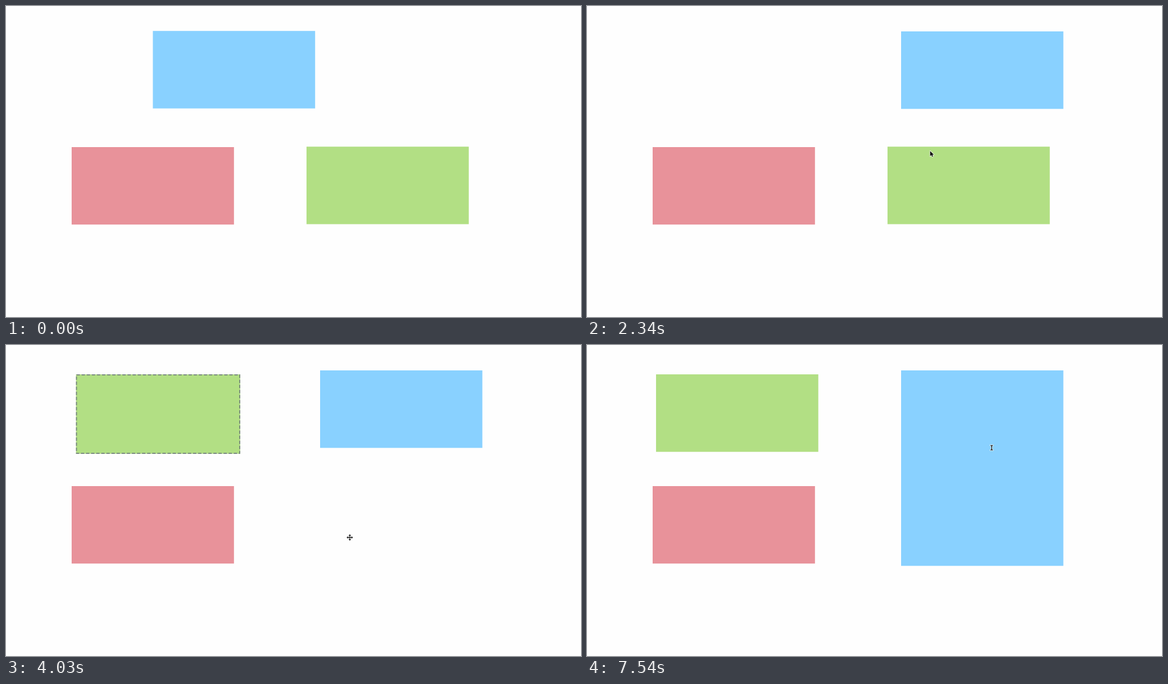
These frames come from a looping animation (1016 px wide and 551 px high, 8000 ms). An HTML page:

```html
<!DOCTYPE html>
<html lang="en">
<head>
<meta charset="utf-8">
<title>Drag and resize</title>
<style>
  html, body { margin: 0; width: 100%; height: 100%; overflow: hidden; background: #fefefe; }
  svg { display: block; width: 100%; height: 100%; }
  .frame { fill: none; stroke: #72807c; stroke-width: 1.7; stroke-dasharray: 6 3; }
  .halo { fill: #fff; stroke: #fff; stroke-width: 1.8; stroke-linejoin: round; opacity: .7; }
</style>
</head>
<body>
<svg viewBox="0 0 1016 551">
  <rect x="116" y="250" width="286.8" height="137.2" fill="#e8929a"/>
  <g id="blue"><rect fill="#89d1ff"/><rect class="frame"/></g>
  <g id="green"><rect fill="#b2df84"/><rect class="frame"/></g>
  <g id="cursor">
    <g id="arrow">
      <path class="halo" d="M0 0V9L2.1 7L3.7 10.2L5.1 9.5L3.7 6.5H6.6Z"/>
      <path d="M0 0V9L2.1 7L3.7 10.2L5.1 9.5L3.7 6.5H6.6Z" fill="#111"/>
    </g>
    <g id="move">
      <path d="M-4 0H4M0 -4V4" stroke="#222" stroke-width="1.3"/>
      <path d="M-5.7 0l2.7-2.3v4.6zM5.7 0l-2.7-2.3v4.6zM0-5.7l-2.3 2.7h4.6zM0 5.7l-2.3-2.7h4.6z" fill="#222"/>
    </g>
    <g id="size">
      <path class="halo" d="M-2.8-4.6H2.8L.7-2.6V2.6L2.8 4.6H-2.8L-.7 2.6V-2.6Z"/>
      <path d="M-2.8-4.6H2.8L.7-2.6V2.6L2.8 4.6H-2.8L-.7 2.6V-2.6Z" fill="#222"/>
    </g>
  </g>
</svg>
<script>
const LOOP = 8000, STEP = 130, LAST = 7540;
const W = 286.7, H = 137.3, TALL = 346.3, EDGE = 1.7;
const $ = id => document.getElementById(id);

const clamp = u => Math.min(1, Math.max(0, u));
const easeOut = u => 1 - (1 - u) ** 2;
const easeInOut = u => (1 - Math.cos(Math.PI * u)) / 2;
const mix = (a, b, u) => a + (b - a) * u;

// Key points: [time, x, y]; each leg slows down as it arrives.
const bluePath = [[910, 259.5, 44.2], [1535, 565, 44.4], [2080, 555, 45]];
const greenPath = [[2730, 531, 249.2], [3220, 128.6, 47.5], [4030, 123.7, 52], [4290, 122, 52]];

// The pointer stands still while a box is held, then reappears where it was let go.
const grabBlue = [383.4, 127.4], grabGreen = [607.5, 341], grabEdge = [715, 182];
const cursorPath = [
  [130, 440, 232], [780, ...grabBlue], [1950, ...grabBlue],
  [2080, 679, 128], [2340, 606.3, 257], [2600, ...grabGreen], [4420, ...grabGreen],
  [4550, 198, 143], [5200, 665, 222], [5330, 665, 222], [5720, 728, 194.3], [6240, ...grabEdge]
];

function along(path, t) {
  const next = path.findIndex(p => p[0] > t);
  const b = path.at(next), a = next > 0 ? path[next - 1] : b;
  const u = a === b ? 0 : easeOut((t - a[0]) / (b[0] - a[0]));
  return [mix(a[1], b[1], u), mix(a[2], b[2], u)];
}

function setRect(el, x, y, width, height) {
  for (const [name, value] of Object.entries({ x, y, width, height })) el.setAttribute(name, value);
}

function drawBox(id, [x, y], h, held) {
  const [fill, frame] = $(id).children;
  const grow = held ? 2 * EDGE : 0;
  setRect(fill, x, y, W + grow, h + grow);
  setRect(frame, x + EDGE / 2, y + EDGE / 2, W + EDGE, h + EDGE);
  frame.style.display = held ? "" : "none";
}

function draw(t) {
  const blueHeld = t >= 1040 && t < 2080;
  const greenHeld = t >= 2730 && t < 4550;
  const stretch = easeInOut(clamp((t - 6500) / (LAST - 6500)));
  drawBox("blue", along(bluePath, t), mix(H, TALL, stretch), blueHeld);
  drawBox("green", along(greenPath, t), H, greenHeld);

  const kind = t < STEP ? "" : blueHeld || greenHeld ? "move" : t > 6000 ? "size" : "arrow";
  for (const id of ["arrow", "move", "size"]) $(id).style.display = id === kind ? "" : "none";
  $("cursor").setAttribute("transform", `translate(${along(cursorPath, t)})`);
}

const start = performance.now();
function tick() {
  const t = (performance.now() - start) % LOOP;
  draw(Math.min(LAST, Math.floor(t / STEP) * STEP));
  requestAnimationFrame(tick);
}
tick();
</script>
</body>
</html>
```
